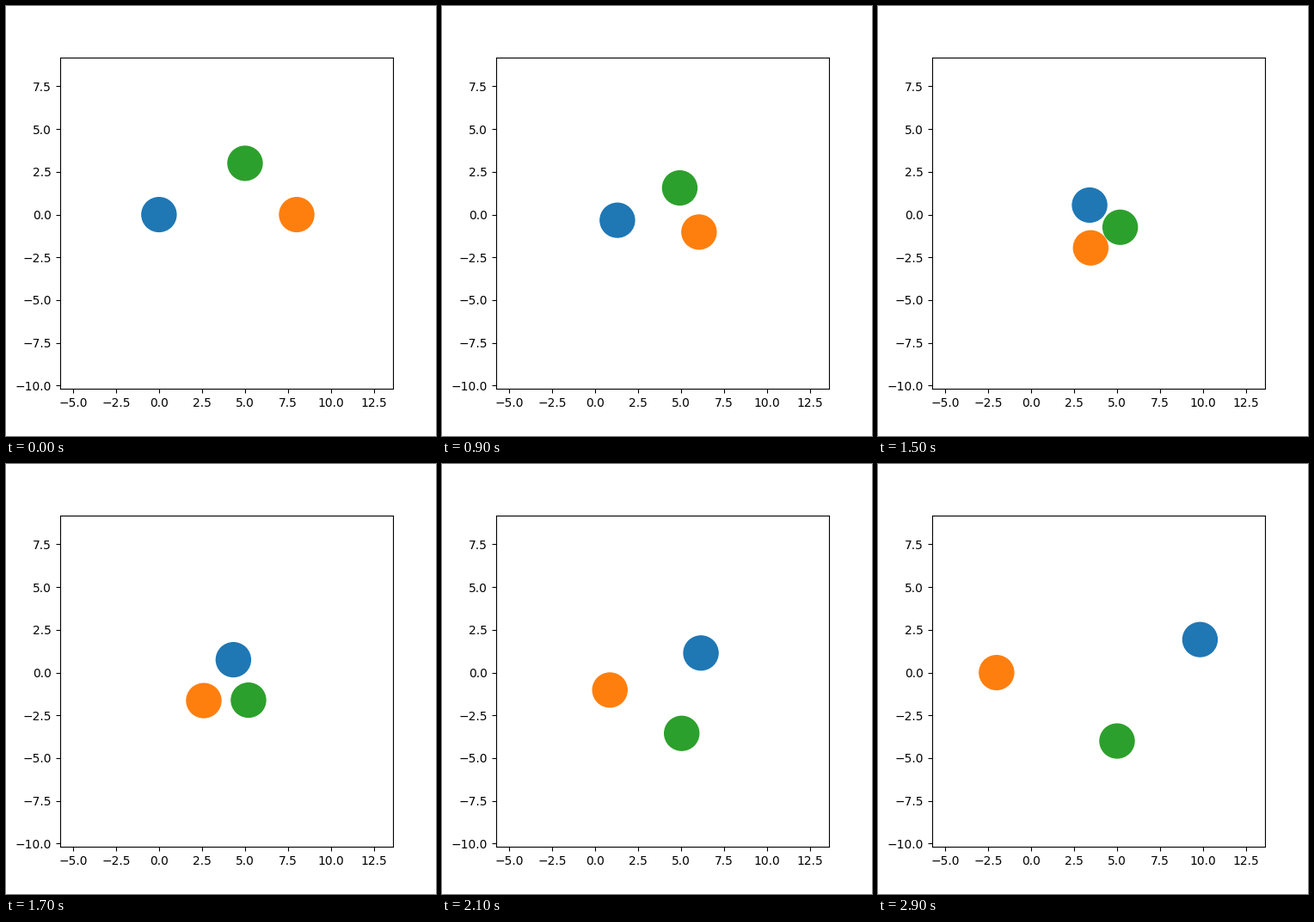
These frames come from a looping animation (500 by 500 pixels, 3.1 s). A matplotlib script:

```python
import numpy as np
import matplotlib.pyplot as plt
from matplotlib.animation import FuncAnimation

TICK_MS = 100
HOLD_TICKS = 5   # the opening pose stays longer than the others
STEP_TICKS = 2
LAST_STEP = 13
RADIUS = 1
VIEW_CENTER = (3.915, -0.5)
VIEW_HALF = 9.68


class Disc:
    """Dodges along a few (step, x, y) keys, then cruises straight to its goal."""

    def __init__(self, color, keys, goal, speed):
        self.times, *self.coords = np.transpose(keys)
        self.goal = np.array(goal)
        self.speed = speed
        self.patch = plt.Circle(self.position(0), RADIUS, color=color)

    def position(self, step):
        dodge = np.array([np.interp(step, self.times, c) for c in self.coords])
        to_goal = self.goal - dodge
        distance = np.hypot(*to_goal)
        cruised = self.speed * max(0, step - self.times[-1])
        return dodge + to_goal * min(1, cruised / distance)


discs = [
    Disc("C0", [(0, 0, 0), (3, 1.3, -0.33), (5, 2.49, 0.36)],
         goal=(10, 1.97), speed=0.937),
    Disc("C1", [(0, 8, 0), (2, 6.8, -0.565), (4, 5.29, -1.475), (6, 3.47, -1.945)],
         goal=(-2, 0), speed=0.921),
    Disc("C2", [(0, 5, 3), (3, 4.925, 1.56), (5, 5.165, 0.13), (7, 5.2, -1.61)],
         goal=(5, -4), speed=0.975),
]

fig, ax = plt.subplots(figsize=(5, 5), dpi=100)
cx, cy = VIEW_CENTER
ax.set_xlim(cx - VIEW_HALF, cx + VIEW_HALF)
ax.set_ylim(cy - VIEW_HALF, cy + VIEW_HALF)
for disc in discs:
    ax.add_patch(disc.patch)


def update(tick):
    step = max(0, 1 + (tick - HOLD_TICKS) // STEP_TICKS)
    for disc in discs:
        disc.patch.center = disc.position(step if tick >= HOLD_TICKS else 0)
    return [disc.patch for disc in discs]


anim = FuncAnimation(fig, update, frames=HOLD_TICKS + LAST_STEP * STEP_TICKS,
                     interval=TICK_MS, repeat=True, repeat_delay=0)
plt.show()
```
